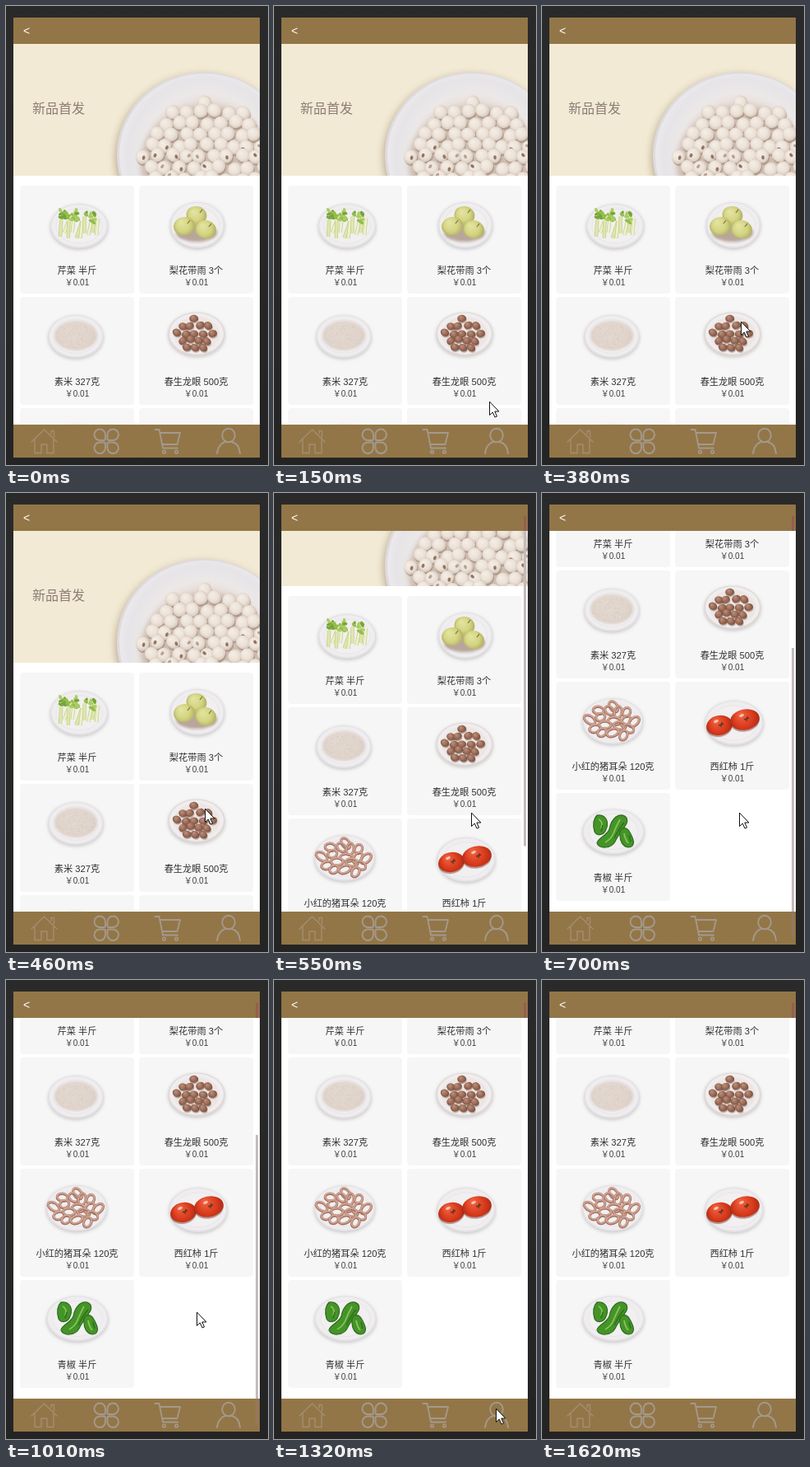
Write an HTML page with a canvas that moves like this. It is 319 by 557 pixels and loops after 2080 ms.

```html
<!DOCTYPE html>
<html lang="zh">
<head>
<meta charset="utf-8">
<style>
html, body { margin: 0; width: 100%; height: 100%; overflow: hidden; background: #272727; }
canvas { display: block; }
</style>
</head>
<body>
<canvas id="stage" width="319" height="557"></canvas>
<script>
const LOOP = 2080, TAU = Math.PI * 2;
const FONT = '"Liberation Sans", "Noto Sans CJK SC", "Noto Sans CJK", sans-serif';
const stage = document.getElementById('stage').getContext('2d');
const page = document.createElement('canvas');
page.width = 319;
page.height = 770;
let g = page.getContext('2d');

let seed = 7;
const rand = () => (seed = seed * 16807 % 2147483647) / 2147483647;
const jitter = n => (rand() - .5) * 2 * n;

function ellipse(x, y, rx, ry, fill, angle = 0, stroke, width = 1) {
  g.beginPath();
  g.ellipse(x, y, rx, ry, angle, 0, TAU);
  if (fill) { g.fillStyle = fill; g.fill(); }
  if (stroke) { g.strokeStyle = stroke; g.lineWidth = width; g.stroke(); }
}

function line(d, color, width, fill) {
  const path = new Path2D(d);
  if (fill) { g.fillStyle = fill; g.fill(path); }
  g.strokeStyle = color;
  g.lineWidth = width;
  g.stroke(path);
}

function rect(x, y, w, h, color) {
  g.fillStyle = color;
  g.fillRect(x, y, w, h);
}

function text(str, x, y, size, color, align = 'center') {
  g.font = `${size}px ${FONT}`;
  g.textAlign = align;
  g.fillStyle = color;
  g.fillText(str, x, y);
}

// Radial shading with the light at the upper left
function shade(x, y, r, light, mid, dark) {
  const s = g.createRadialGradient(x - r * .3, y - r * .35, r * .1, x, y, r * 1.05);
  s.addColorStop(0, light);
  s.addColorStop(.6, mid);
  s.addColorStop(1, dark);
  return s;
}

// Calls draw for each point of a loose hexagonal packing in an ellipse
function pack(rx, ry, dx, dy, wobble, draw) {
  for (let y = -ry, row = 0; y <= ry; y += dy, row++)
    for (let x = -Math.ceil(rx / dx) * dx + (row % 2) * dx / 2; x <= rx; x += dx)
      if ((x / rx) ** 2 + (y / ry) ** 2 <= 1) draw(x + jitter(wobble), y + jitter(wobble));
}

function plate(rx, ry, rim = '#e4e2e4', inner = '#f1eff0') {
  g.save();
  g.shadowColor = 'rgba(90,80,85,.3)';
  g.shadowBlur = 4;
  g.shadowOffsetY = 1.5;
  ellipse(0, 0, rx, ry, rim);
  g.restore();
  ellipse(0, -.5, rx - 1.5, ry - 1.5, '#efedef');
  ellipse(0, 0, rx * .8, ry * .78, inner, 0, '#e9e6e8');
}

function celery() {
  plate(35, 27);
  for (let i = 0; i < 10; i++) {
    const x = -23 + i * 4.9, y = 11 + jitter(4), top = x + 4 + jitter(4);
    line(`M${x} ${y}L${top} ${y - 20}`, '#c3cf85', 4.4);
    line(`M${x} ${y}L${top} ${y - 20}`, i % 2 ? '#eef0cf' : '#dfe6ae', 3);
  }
  for (let i = 0; i < 36; i++) {
    const right = i % 4 == 0;
    ellipse((right ? 14 : -11) + jitter(right ? 6 : 13), (right ? -10 : -13) + jitter(6), 3.2, 1.8,
      ['#76a637', '#93bd4c', '#abcc62'][i % 3], jitter(1.5));
  }
}

function pears() {
  plate(33, 28);
  g.save();
  g.filter = 'blur(1.5px)';
  ellipse(-1, 9, 25, 11, 'rgba(130,95,70,.5)');
  g.restore();
  for (const [x, y, rx, ry, a] of [[-1, -12, 12.5, 11, .2], [-16, 1, 13, 11, -.2], [10, 5, 13, 11, .2]]) {
    ellipse(x, y, rx, ry, shade(x, y, rx, '#e3e39f', '#d3d482', '#aeac5d'), a);
    line(`M${x + 4} ${y - 3}l3 -4`, '#7d7238', 1.2);
  }
}

function rice() {
  plate(33.5, 26);
  g.save();
  g.filter = 'blur(1px)';
  ellipse(0, -1, 26, 18, shade(0, -1, 27, '#e2d7ce', '#e0d4cb', '#dbd0c9'));
  g.restore();
  for (let i = 0; i < 260; i++) {
    const a = rand() * TAU, r = Math.sqrt(rand());
    rect(Math.cos(a) * r * 25, -1 + Math.sin(a) * r * 17, 1, 1, i % 2 ? '#e6dcd4' : '#d8cabf');
  }
}

function longans() {
  plate(34.5, 26.5, '#e3d8d2', '#efe5e0');
  g.save();
  g.translate(-2, 0);
  pack(24, 18, 10.5, 8.5, 1.4, (x, y) => {
    const a = jitter(.7);
    ellipse(x + .6, y + 1.5, 5.4, 4.4, 'rgba(80,50,40,.35)', a);
    ellipse(x, y, 5.4, 4.4, shade(x, y, 5.4, '#b98d78', '#976754', '#6d4838'), a);
  });
  g.restore();
}

function pigEars() {
  plate(37, 28);
  pack(28, 20, 13, 8.5, 3, (x, y) => {
    const a = jitter(1.5), rx = 5.5 + rand() * 2.5;
    ellipse(x, y + .8, rx, 4.5, null, a, '#a06f60', 3.2);
    ellipse(x, y, rx, 4.5, null, a, '#cfa493', 2);
  });
}

function tomatoes() {
  plate(35.5, 27);
  for (const [x, y, rx, ry, a] of [[-18, 3, 16, 12, -.2], [13, -4, 18, 12.5, -.2]]) {
    ellipse(x, y + 2, rx, ry, 'rgba(90,30,20,.4)', a);
    ellipse(x, y, rx, ry, shade(x, y, rx, '#ee6040', '#d83a1c', '#aa2a14'), a);
    ellipse(x - 4, y - 5, 3, 1.6, '#ffc3ae', -.4);
    line(`M${x - 1} ${y}l6 -2M${x + 3} ${y - 4}l-1 6`, '#5a3a1c', 1.4);
  }
}

function peppers() {
  plate(37.5, 27.5);
  const bodies = [
    'M-20 -20C-9 -21 -5 -12 -9 -3C-11 4 -20 6 -23 0C-25 -7 -25 -15 -20 -20Z',
    'M3 -18C11 -23 19 -18 16 -10C11 -1 6 3 2 12C-3 21 -17 21 -20 14C-20 8 -8 5 -5 -3C-4 -9 -2 -14 3 -18Z',
    'M11 -4C18 -6 20 1 23 7C26 14 24 19 18 19C11 18 8 11 8 5C7 1 8 -2 11 -4Z'
  ];
  for (const d of bodies) line(d, '#2d6c1f', 1.2, '#459428');
  line('M-18 -15Q-12 -12 -15 -4M8 -15Q3 -6 0 2Q-3 9 -10 13M13 2Q14 9 18 14', '#86c25a', 1.8);
  line('M-13 -8l-2 8M13 -11Q6 -3 1 8M19 4l2 8', '#2d711c', 1.5);
}

function banner() {
  g.save();
  g.beginPath();
  g.rect(9, 46, 300, 160);
  g.clip();
  rect(9, 46, 300, 160, '#f2ead4');
  g.save();
  g.shadowColor = 'rgba(130,105,80,.45)';
  g.shadowBlur = 9;
  g.shadowOffsetX = -2;
  g.shadowOffsetY = 3;
  ellipse(241, 181, 106, 101, '#dedbde');
  g.restore();
  const bowl = g.createRadialGradient(243, 185, 60, 242, 181, 105);
  bowl.addColorStop(0, '#e4d8d0');
  bowl.addColorStop(.4, '#ece8e8');
  bowl.addColorStop(.75, '#e6e4e7');
  bowl.addColorStop(1, '#eceaec');
  ellipse(242, 181, 104, 99, bowl);
  g.translate(244, 187);
  g.save();
  g.filter = 'blur(3px)';
  ellipse(0, 4, 80, 70, '#cdbcb0');
  g.restore();
  pack(80, 72, 17, 13.5, 2.5, (x, y) => {
    const a = jitter(1.5), hole = rand();
    ellipse(x + 1, y + 2.5, 8.8, 8, 'rgba(130,102,88,.4)', a);
    ellipse(x, y, 9, 8.2, shade(x, y, 9, '#f4ede5', '#ebe1d7', '#d3c2b6'), a);
    if (y > -25 && hole > .5) ellipse(x + jitter(4), y + jitter(3), 2.6, 1.8, hole > .75 ? '#937465' : '#b9a094', a);
  });
  g.restore();
  text('新品首发', 32, 130, 16, '#8d7b76', 'left');
}

const goods = [
  ['芹菜 半斤', celery, 72, 49], ['梨花带雨 3个', pears, 71, 48],
  ['素米 327克', rice, 68, 48], ['春生龙眼 500克', longans, 70, 45],
  ['小红的猪耳朵 120克', pigEars, 69, 48], ['西红柿 1斤', tomatoes, 72, 50],
  ['青椒 半斤', peppers, 70, 47]
];

function drawPage() {
  rect(0, 0, 319, 770, '#fff');
  banner();
  goods.forEach(([name, food, cx, cy], i) => {
    const x = 17 + i % 2 * 145, y = 218 + (i >> 1) * 135;
    g.fillStyle = '#f6f6f6';
    g.beginPath();
    g.roundRect(x, y, 139, 131, 4);
    g.fill();
    g.save();
    g.translate(x + cx, y + cy);
    food();
    g.restore();
    text(name, x + 69.5, y + 107, 11.2, '#303030');
    text('￥0.01', x + 69.5, y + 121, 10, '#404040');
  });
}

function footer() {
  rect(9, 508, 300, 40, '#937647');
  g.lineJoin = g.lineCap = 'round';
  line('M31 529L46.500 514L62 529M35 526V542.500H43V532H50V542.500H58V526M55 519V515.500H58.500V523', '#a38e70', 1.4);
  g.beginPath();
  for (const [x, y, inner] of [[107.5, 513.5, 2], [123.5, 513.5, 3], [123.5, 529.5, 0], [107.5, 529.5, 1]]) {
    const radii = [7, 7, 7, 7];
    radii[inner] = 2;
    g.roundRect(x, y, 13.5, 13.5, radii);
  }
  g.lineWidth = 1.9;
  g.strokeStyle = '#a4998d';
  g.stroke();
  line('M181.500 514H186.500L191 536.500H209M187.500 518H212L208.500 532H190.500', '#a4998d', 1.8);
  ellipse(192.5, 541, 1.8, 1.8, null, 0, '#a4998d', 1.6);
  ellipse(207.5, 541, 1.8, 1.8, null, 0, '#a4998d', 1.6);
  ellipse(271, 521, 7.8, 8.2, null, 0, '#a4998d', 1.9);
  line('M257 543C258 534 263 530 267 529M275 529C280 530 284 534 285 543', '#a4998d', 1.9);
}

function cursor(x, y) {
  g.save();
  g.translate(x + .5, y + .5);
  g.lineJoin = 'miter';
  line('M0 0V16L3.700 12.500L6.500 18.500L9 17.500L6.300 11.500H11Z', '#111', 1, '#fff');
  g.restore();
}

// [start ms, value...]; each value holds until the next start
const pointer = [
  [0], [70, 272, 529], [150, 262, 480], [220, 252, 430], [300, 245, 395], [380, 242, 383],
  [470, 240, 388], [850, 238, 391], [930, 234, 397], [1010, 232, 403], [1080, 231, 411],
  [1160, 237, 443], [1240, 256, 492], [1320, 270, 520], [1390, 272, 529], [1470, 276, 538],
  [1550, 280, 548], [1620]
];
const scrolls = [[0, 0], [470, 21], [550, 93], [620, 218], [700, 259]];
const at = (steps, t) => steps.findLast(s => s[0] <= t);

function draw(t) {
  const scroll = at(scrolls, t)[1], [, px, py] = at(pointer, t);
  const back = g.createLinearGradient(0, 0, 0, 557);
  back.addColorStop(0, '#2a2a2a');
  back.addColorStop(1, '#242424');
  rect(0, 0, 319, 557, back);
  g.drawImage(page, 9, 46 + scroll, 300, 462, 9, 46, 300, 462);
  rect(9, 14, 300, 32, '#937647');
  text('<', 21, 35, 14, '#fff', 'left');
  footer();
  if (t >= 470) rect(304, 28, 3, 18, '#985c50');
  if (t >= 470 && t < 1160) {
    const top = 14 + scroll * .672, start = t < 620 ? 46 : top;
    rect(304, start, 3, Math.min(top + 352, 508) - start, '#c3bcbc');
    if (top > 156) rect(304, 508, 3, top - 156, '#987760');
  }
  if (px) cursor(px, py);
}

drawPage();
g = stage;
const begin = performance.now();
(function frame() {
  draw((performance.now() - begin) % LOOP);
  requestAnimationFrame(frame);
})();
</script>
</body>
</html>
```
